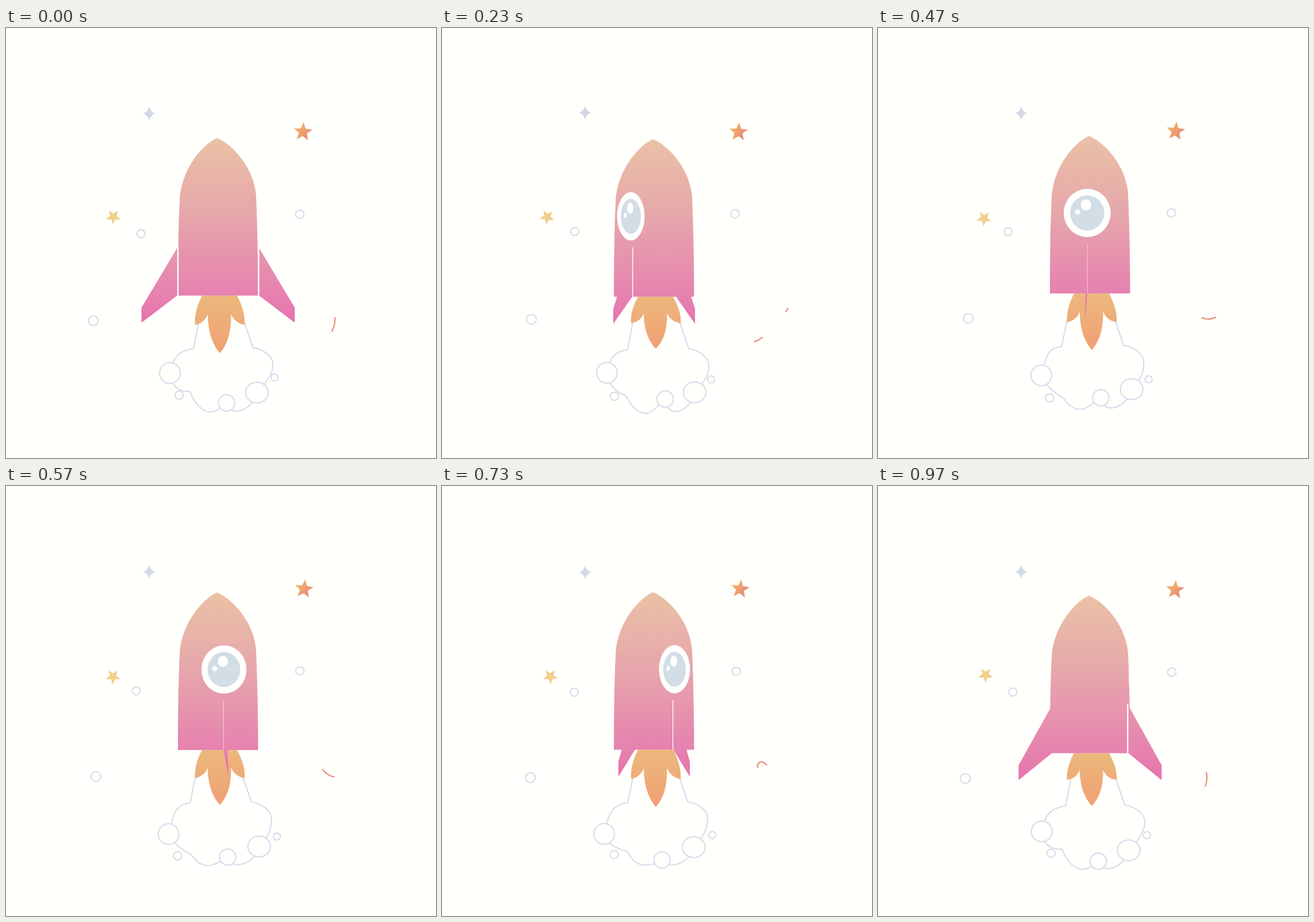
Animation, 748 px wide and 748 px high, one loop 1 s. Source, as an HTML page:

```html
<!DOCTYPE html>
<html lang="en">
<head>
<meta charset="utf-8">
<title>Rocket</title>
<style>
  html, body { margin: 0; width: 100%; height: 100%; overflow: hidden; background: #fffffc; }
  svg { display: block; width: 100vw; height: 100vh; }
  .line { fill: none; stroke: #d6daea; stroke-width: 2; stroke-linejoin: round; stroke-linecap: round; }
  .bubble { fill: #fffffc; stroke: #d6daea; stroke-width: 2; }
  .streak { fill: none; stroke: #e58f74; stroke-width: 2.2; stroke-dasharray: 26 999; }
</style>
</head>
<body>
<svg viewBox="0 0 748 748">
  <defs>
    <linearGradient id="hull" gradientUnits="userSpaceOnUse" x1="0" y1="192" x2="0" y2="513">
      <stop offset="0" stop-color="#eac1a5"/>
      <stop offset=".4" stop-color="#e6a8ab"/>
      <stop offset=".82" stop-color="#e684af"/>
      <stop offset="1" stop-color="#e574ad"/>
    </linearGradient>
    <linearGradient id="fire" x1="0" y1="0" x2="0" y2="1">
      <stop offset="0" stop-color="#ecb87c"/>
      <stop offset="1" stop-color="#f0a074"/>
    </linearGradient>
    <linearGradient id="ember" x1="0" y1=".2" x2="1" y2=".8">
      <stop offset=".2" stop-color="#f2b066"/>
      <stop offset=".8" stop-color="#e78f78"/>
    </linearGradient>
    <path id="shell" d="M367 192C342 203 308 243 302.500 292C300.500 330 299 380 299 466H438.500C438.500 400 437 340 435 292C431 243 394 203 367 192Z"/>
    <clipPath id="inside"><use href="#shell"/></clipPath>
  </defs>

  <path id="spark" fill="#d2d9e6" d="M0-12Q2.500-2.500 10.500 0Q2.500 2.500 0 12Q-2.500 2.500-10.500 0Q-2.500-2.500 0-12Z"/>
  <path id="redStar" fill="url(#ember)"/>
  <path id="goldStar" fill="#f1cf8c"/>
  <g id="dots"></g>
  <path class="streak"/>
  <path class="streak"/>

  <path id="cloud" class="line"/>
  <g id="puffs"></g>

  <g id="rocket">
    <path id="backFin" fill="url(#hull)"/>
    <path id="flame" fill="url(#fire)" d="M341 0C335 12 327 32 329 51C339 49 348 42 351 32C351 60 358 84 372 100C386 84 392 62 391.500 32C396 43 404 49 415 51C417 32 408 12 402 0Z"/>
    <use href="#shell" fill="url(#hull)"/>
    <g clip-path="url(#inside)">
      <g id="port">
        <circle r="42" fill="#fffffe"/>
        <circle r="30.500" fill="#d3dde6"/>
        <circle cx="-2" cy="-14" r="9.500" fill="#fffffe"/>
        <circle cx="-17" cy="-1.500" r="4.500" fill="#fffffe"/>
      </g>
    </g>
    <path id="frontFin" fill="url(#hull)"/>
    <path id="seam" stroke="#fffffc"/>
    <path id="farSeam" stroke="#fffffc" stroke-width="2.300" d="M439.500 380V466"/>
  </g>
</svg>
<script>
const $ = id => document.getElementById(id);
const NS = "http://www.w3.org/2000/svg";
const STEPS = 30;
const AXIS = 369;
const RADIUS = 70;

// One slow swing per loop, highest at step `peak`.
const wave = (mid, amp, peak) => k => mid + amp * Math.cos((k - peak) / STEPS * 2 * Math.PI);
const both = (x, y) => k => [x(k), y(k)];

const lift = wave(-2.8, 4.8, 5);
const burn = k => .95 + .05 * Math.cos(11 * k / STEPS * 2 * Math.PI);

const sparkAt = both(() => 249, wave(148.7, 1.5, 23));
const redAt = both(wave(517.3, 1.5, 20), wave(180.2, 1, 4));
const redTurn = wave(5, 2, 20);
const goldAt = both(wave(185.8, 3, 24), wave(330, 1.8, 18));
const goldTurn = wave(-34, 5, 8);

const left = both(wave(323, 3.3, 29), k => 558.3 + lift(k));
const right = both(wave(428.3, 1.5, 3), k => 556.3 + lift(k));
const knee = both(wave(321.5, 1.7, 17), wave(638, 6.5, 13));
const belly = both(wave(354.2, 2, 2), wave(665, 6, 5));
const sag = wave(628, 6.5, 1);

const puffL = both(wave(284.5, 2.4, 6), wave(602.5, 3.4, 19));
const puffM = both(wave(385.5, 3.3, 10), wave(648, 5.2, 27));
const puffR = both(wave(438.7, 2.6, 13), wave(631, 4, 3));

const bubble = (host, at, rx, ry = rx) => {
  const el = document.createElementNS(NS, "ellipse");
  el.setAttribute("class", "bubble");
  el.setAttribute("rx", rx);
  el.setAttribute("ry", ry);
  $(host).append(el);
  return { el, at };
};
const bubbles = [
  bubble("puffs", puffL, 18),
  bubble("puffs", puffM, 14.2),
  bubble("puffs", puffR, 19.7, 18),
  bubble("puffs", both(wave(299.7, 1.4, 0), wave(641, 2.4, 15)), 7.2),
  bubble("puffs", both(wave(469.2, 2, 17), wave(609.3, 2.7, 10)), 6.2),
  bubble("dots", both(wave(230.5, 4.3, 0), wave(356.5, 3, 25)), 7),
  bubble("dots", both(wave(510.8, .9, 23), wave(322.8, 1.2, 1)), 7.3),
  bubble("dots", both(wave(154.5, 2.8, 13), wave(507, 2, 29)), 8.5)
];

const starPath = r => {
  let d = "";
  for (let i = 0; i < 10; i++) {
    const a = i * Math.PI / 5, q = i % 2 ? r * .43 : r;
    d += (i ? "L" : "M") + (q * Math.sin(a)).toFixed(2) + " " + (-q * Math.cos(a)).toFixed(2);
  }
  return d + "Z";
};
$("redStar").setAttribute("d", starPath(16.8));
$("goldStar").setAttribute("d", starPath(13.5));

const streaks = document.querySelectorAll(".streak");
for (const s of streaks) {
  s.setAttribute("d", "M602 487C592 508 573 509 562 503C552 497 546 488 550 483C555 475 569 483 572 503C574 525 560 540 543 546");
}

const place = (id, [x, y], turn = 0) =>
  $(id).setAttribute("transform", `translate(${x} ${y}) rotate(${turn})`);

const finPath = x => {
  const tip = AXIS + (x - AXIS) * 1.905;
  return `M${x} 381L${tip} 487V513L${x} 465Z`;
};

function cloudPath(k) {
  const [lx, ly] = left(k), [rx, ry] = right(k), [kx, ky] = knee(k), [bx, by] = belly(k);
  const [ax, ay] = puffL(k), [mx, my] = puffM(k), [ex, ey] = puffR(k);
  const px = rx + 35, py = ry + 29;
  return `M${lx + 9} ${ly - 46}L${lx} ${ly}` +
    `C${lx - 18} ${ly + 2} ${ax + 9} ${ly + 9} ${ax + 4} ${ay - 14}` +
    `L${ax} ${ay}Q${ax + 4} ${sag(k)} ${kx} ${ky}` +
    `C${kx + 8} ${ky + (by - ky) * .6} ${bx - 14} ${by} ${bx} ${by}` +
    `Q${bx + 10} ${by} ${mx - 6} ${my + 4}L${mx} ${my}` +
    `C${mx + 2} ${by + 5} ${ex - 17} ${by + 5} ${ex} ${ey + 5}` +
    `L${ex} ${ey}C${ex + 20} ${ey - 20} ${px} ${py + 13} ${px} ${py}` +
    `C${px - 1} ${py - 15} ${rx + 18} ${ry + 3} ${rx} ${ry}L${rx - 16} ${ry - 47}`;
}

function drawRocket(k) {
  place("rocket", [0, lift(k)]);
  $("flame").setAttribute("transform", `translate(0 466) scale(1 ${burn(k)})`);

  // The front fin and the porthole cross the hull once per loop.
  const u = 2 * k / STEPS - 1;
  const x = AXIS + RADIUS * u;
  $("frontFin").setAttribute("d", finPath(x));
  $("backFin").setAttribute("d", finPath(2 * AXIS - x));
  $("seam").setAttribute("d", `M${x} 380V466`);
  $("seam").setAttribute("stroke-width", .4 + 2 * Math.abs(u));
  $("farSeam").style.display = k ? "none" : "";

  const w = 1 - Math.abs(u) ** 1.35;
  $("port").style.display = w ? "" : "none";
  $("port").setAttribute("transform", `translate(${AXIS + 76 * u} 326) scale(${w} 1)`);
}

function draw(k) {
  for (const { el, at } of bubbles) {
    const [x, y] = at(k);
    el.setAttribute("cx", x);
    el.setAttribute("cy", y);
  }
  place("spark", sparkAt(k));
  place("redStar", redAt(k), redTurn(k));
  place("goldStar", goldAt(k), goldTurn(k));
  $("cloud").setAttribute("d", cloudPath(k));
  drawRocket(k);
  streaks.forEach((s, i) => {
    const head = 5.6 * (k + i * STEPS) - 31;
    s.style.strokeDashoffset = 26 - head;
  });
}

const start = performance.now();
function tick() {
  const t = (performance.now() - start) % 1000;
  draw(Math.floor((t + 3.4) * STEPS / 1000) % STEPS);
  requestAnimationFrame(tick);
}
tick();
</script>
</body>
</html>
```
